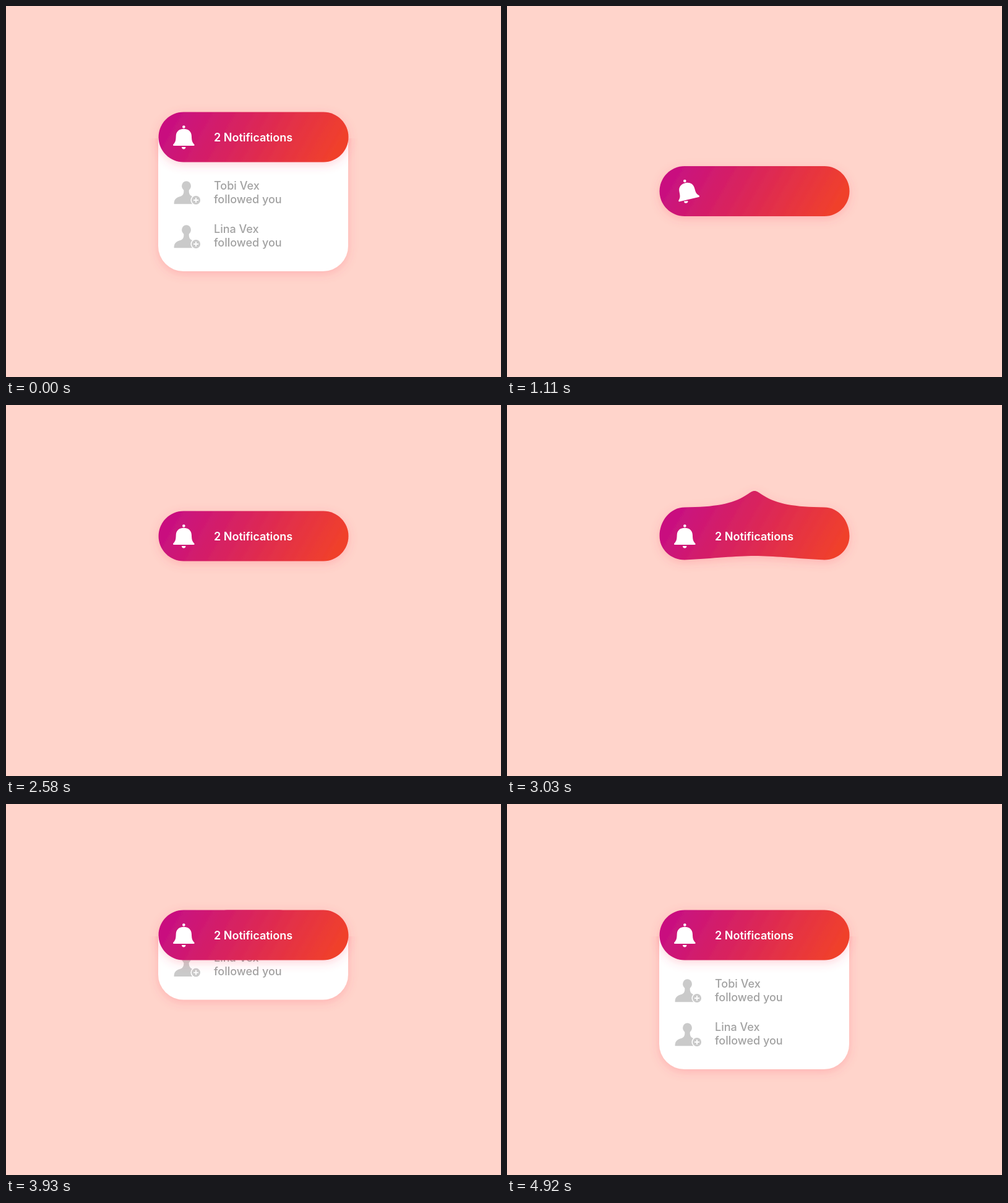
Animation, 800 px wide and 600 px high, one loop 5.88 s. Source, as an HTML page:

```html
<!DOCTYPE html>
<html lang="en">
<head>
<meta charset="utf-8">
<title>Notifications</title>
<style>
  html, body { margin: 0; width: 100%; height: 100%; overflow: hidden; background: #ffd4cb; }
  svg { display: block; width: 800px; height: 600px; }
  text { font: 500 18px Inter, "Open Sans", sans-serif; fill: #a2a2a2; }
  #label { font-weight: 600; fill: #fff; }
</style>
</head>
<body>
<svg viewBox="0 0 800 600">
  <defs>
    <linearGradient id="hot" gradientUnits="userSpaceOnUse" x1="281" y1="143" x2="519" y2="281">
      <stop offset=".06" stop-color="#c9117f"/>
      <stop offset=".96" stop-color="#f0402b"/>
    </linearGradient>
    <filter id="glow" filterUnits="userSpaceOnUse" x="200" y="90" width="400" height="400">
      <feDropShadow dx="0" dy="4" stdDeviation="8" flood-color="#ff4668" flood-opacity=".24"/>
    </filter>
    <clipPath id="below"><rect y="214" width="800" height="386"/></clipPath>
    <g id="person">
      <g fill="#cacaca">
        <ellipse cx="291.5" cy="291.2" rx="7.4" ry="8"/>
        <path d="M271.5 320.3C271.6 311 276.5 309.8 283 307.6Q288 305.5 287.3 297H295.7Q295 305.5 300 307.6C306 309.6 310 311 309 320.3Z"/>
      </g>
      <circle cx="307" cy="314" r="8.6" fill="#fff"/>
      <circle cx="307" cy="314" r="7" fill="#cacaca"/>
      <path d="M303 314h8M307 310v8" stroke="#fff" stroke-width="1.8"/>
    </g>
  </defs>

  <g clip-path="url(#below)">
    <g id="card">
      <rect x="246" y="172" width="307" height="257" rx="41" fill="#fff" filter="url(#glow)"/>
      <use href="#person"/>
      <text x="336" y="297">Tobi Vex</text>
      <text x="336" y="319">followed you</text>
      <use href="#person" y="71"/>
      <text x="336" y="367">Lina Vex</text>
      <text x="336" y="389">followed you</text>
    </g>
  </g>

  <g id="pill">
    <path id="blob" fill="url(#hot)" filter="url(#glow)"/>
    <g fill="#fff">
      <circle cx="287.3" cy="195.5" r="2.3"/>
      <path id="bell" d="M271.4 226Q269 225.6 270.6 223.4C274.2 220 274.4 217 274.7 210C275.1 202.6 280.4 198.8 287.3 198.8C294.2 198.8 299.5 202.6 299.9 210C300.2 217 300.4 220 304 223.4Q305.6 225.6 303.2 226Z"/>
      <path id="clapper" d="M284 228h6.4a3.2 3.4 0 0 1-6.4 0z"/>
    </g>
    <text id="label" x="336" y="219">2 Notifications</text>
  </g>
</svg>
<script>
const LOOP = 5880, STEP = 30, END = 4920;
const $ = id => document.getElementById(id);

const ease = {
  linear: p => p,
  in: p => p * p,
  out: p => 1 - (1 - p) ** 2,
  slow: p => 1 - (1 - p) ** 3,
  both: p => p * p * (3 - 2 * p)
};

// Rows: [time, value, easing used to get there]
const pillY = [[1830, 87.5], [2055, 100.5, 'both'], [2370, 0, 'both']];
const pull = [[2600, 0], [3615, 1, 'slow'], [3740, -.12, 'both'], [3860, .04, 'both'], [3960, 0, 'both']];
const cardY = [[3640, -177], [4120, 0, 'in'], [4340, -20.6, 'out'], [4560, 0, 'in'],
  [4670, -6, 'out'], [4780, 0, 'in'], [4840, -1.5, 'out'], [4900, 0, 'in']];
const labelFade = [[1440, 0], [1740, 1, 'linear']];

function at(track, t) {
  if (t <= track[0][0]) return track[0][1];
  for (let i = 1; i < track.length; i++) {
    const [t0, a] = track[i - 1], [t1, b, kind] = track[i];
    if (t < t1) return a + (b - a) * ease[kind]((t - t0) / (t1 - t0));
  }
  return track[track.length - 1][1];
}

// Pill outline; k pulls the middle up into a peak.
function outline(k) {
  const up = d => 171.5 - d * k;
  const top = up(7.5), tip = up(40.3), mid = 212;
  const low = 252.5 - 2.5 * k, dip = 252.5 - 10.5 * k;
  const hi = mid - (mid - top) * .55, lo = mid + (low - mid) * .55;
  return `M287 ${top}C335 ${top} 365 ${up(14.5)} 385 ${up(30.5)}C393 ${up(37)} 396 ${tip} 400 ${tip}` +
    `C404 ${tip} 407 ${up(37)} 415 ${up(30.5)}C435 ${up(14.5)} 465 ${top} 513 ${top}` +
    `C535.4 ${top} 553.5 ${hi} 553.5 ${mid}C553.5 ${lo} 535.4 ${low} 513 ${low}` +
    `C465 ${low - 3 * k} 430 ${dip} 400 ${dip}C370 ${dip} 335 ${low - 3 * k} 287 ${low}` +
    `C264.6 ${low} 246.5 ${lo} 246.5 ${mid}C246.5 ${hi} 264.6 ${top} 287 ${top}Z`;
}

// Damped swing; the clapper trails the bell.
function swing(t, lag) {
  const p = (t - 660) / 900;
  if (p <= 0 || p >= 1) return 0;
  const phase = Math.max(0, 5 * Math.PI * p - lag);
  return -18 * (1 - p * p) * Math.sin(phase);
}

function draw(t) {
  const turn = a => `rotate(${a} 287.3 195.5)`;
  $('pill').setAttribute('transform', `translate(0 ${at(pillY, t)})`);
  $('blob').setAttribute('d', outline(at(pull, t)));
  $('bell').setAttribute('transform', turn(swing(t, 0)));
  $('clapper').setAttribute('transform', turn(swing(t, 1.3)));
  $('label').setAttribute('opacity', at(labelFade, t));
  $('card').setAttribute('transform', `translate(0 ${at(cardY, t)})`);
  $('card').setAttribute('visibility', t > 3650 ? 'visible' : 'hidden');
}

const start = performance.now();
function tick() {
  const t = Math.floor(Math.max(0, performance.now() - start) % LOOP / STEP) * STEP;
  draw(t < STEP ? END : t);
  requestAnimationFrame(tick);
}
tick();
</script>
</body>
</html>
```
